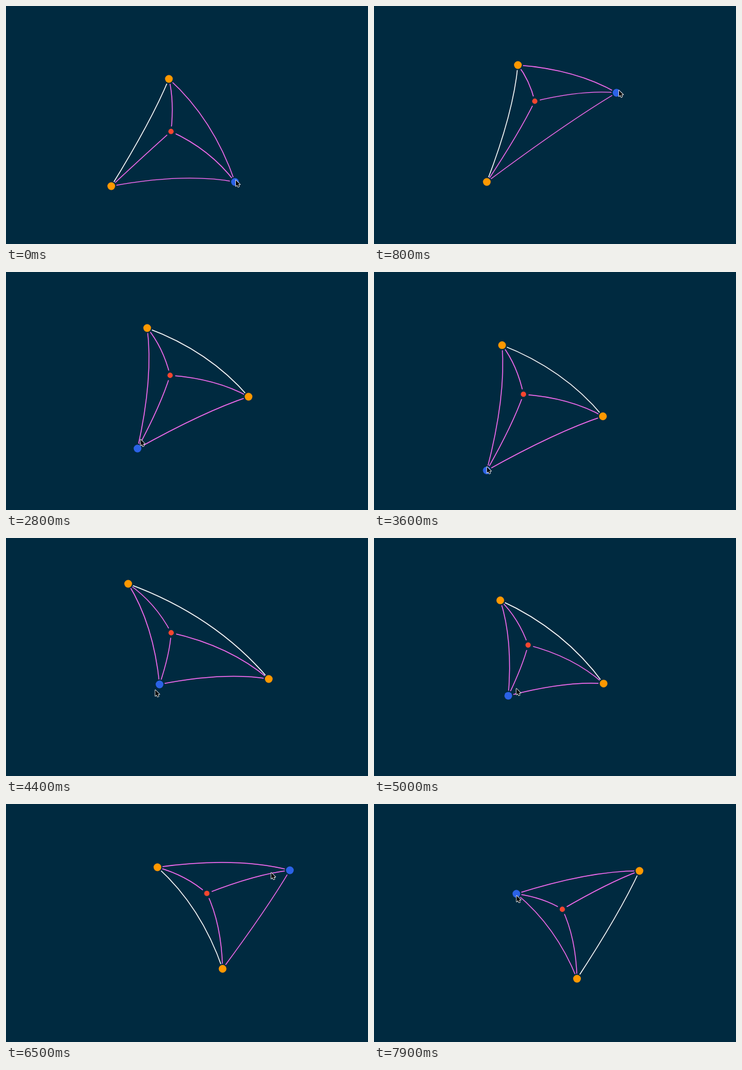
Write an HTML page with a canvas that moves like this. It is 600 px wide and 395 px high and loops after 8000 ms.

```html
<!DOCTYPE html>
<html lang="en">
<head>
<meta charset="utf-8">
<title>Elastic triangle</title>
<style>
html, body { margin: 0; width: 100%; height: 100%; overflow: hidden; background: #002a40; }
canvas { display: block; }
</style>
</head>
<body>
<canvas id="stage" width="600" height="395"></canvas>
<script>
const ctx = document.getElementById('stage').getContext('2d');
const LOOP = 8000, FRAME = 100, STEP = 10, LEAD = 25;
const BG = '#002a40', PINK = '#fa6cf4', ORANGE = '#ff9800', BLUE = '#2b62e6', RED = '#f8462f';
const REST = 202, STIFF = 2, BOW = 0.1, GAP = 14;

// Anchors: time, then x, y of the three corners
const anchors = [
  [0, 270, 121, 174.5, 299, 379.5, 292],
  [800, 238.5, 98, 187, 292, 402, 144],
  [2800, 234, 93, 218, 293, 402, 207],
  [4400, 202.5, 76, 254.5, 243, 435.5, 234],
  [5700, 212.5, 91, 438, 96, 389, 267],
  [6500, 251, 105, 470.5, 110, 359, 273.5],
  [7900, 236, 149, 440, 111, 336.5, 290]
];

// Drags: from, to, corner
const drags = [[0, 1800, 2], [2920, 6300, 1], [6950, LOOP + 1, 0]];
const pairs = [[0, 1], [0, 2], [1, 2]];

function dragged(t) {
  const d = drags.find(d => t >= d[0] && t < d[1]);
  return d ? d[2] : -1;
}

// The hand passes through these turns and through every corner it holds
const turns = [
  [550, 388, 205], [1100, 443, 100], [1800, 404, 208], [2800, 226, 274.5],
  [3300, 170, 350], [3600, 182, 328], [4150, 303, 173], [4750, 134, 353],
  [5400, 414, 76], [6100, 489, 101], [6300, 482, 106], [6500, 447.5, 113],
  [6950, 260, 107], [7300, 249, 110], [8000, 233, 160]
];
const grips = anchors.filter(a => dragged(a[0]) >= 0).map(a => {
  const i = 2 * dragged(a[0]) + 1;
  return [a[0], a[i], a[i + 1]];
});
const path = [...turns, ...grips].sort((a, b) => a[0] - b[0]);

function slope(i, d) {
  const a = path[Math.max(i - 1, 0)], b = path[Math.min(i + 1, path.length - 1)];
  return (b[d] - a[d]) / (b[0] - a[0]);
}

function hand(t) {
  let i = 0;
  while (i < path.length - 2 && t >= path[i + 1][0]) i++;
  const a = path[i], b = path[i + 1], h = b[0] - a[0], u = (t - a[0]) / h;
  const at = d => {
    const s = u * u * (3 - 2 * u);
    return a[d] + (b[d] - a[d]) * s +
      h * u * (1 - u) * (slope(i, d) * (1 - u) - slope(i + 1, d) * u);
  };
  return [at(1), at(2)];
}

// One step of the damped springs; a held corner follows the hand
function relax(p, t) {
  const held = dragged(t), move = p.map(() => 0), g = STIFF * STEP / 1000;
  for (const [i, j] of pairs) {
    const dx = p[2 * j] - p[2 * i], dy = p[2 * j + 1] - p[2 * i + 1];
    const d = Math.max(Math.hypot(dx, dy), 1), f = g * (d - REST) / d;
    move[2 * i] += dx * f; move[2 * i + 1] += dy * f;
    move[2 * j] -= dx * f; move[2 * j + 1] -= dy * f;
  }
  if (held >= 0) {
    const a = hand(t), b = hand(t + STEP);
    move[2 * held] = b[0] - a[0];
    move[2 * held + 1] = b[1] - a[1];
  }
  return p.map((v, i) => v + move[i]);
}

// Run the springs between anchors and spread the remaining drift evenly
const poses = [];
anchors.forEach((key, n) => {
  const start = key[0], next = anchors[n + 1], end = next ? next[0] : LOOP;
  const run = [];
  let p = key.slice(1);
  for (let t = start; t < end; t += STEP) {
    if (t % FRAME === 0) run.push(p);
    p = relax(p, t);
  }
  const drift = p.map((v, i) => next ? next[i + 1] - v : 0);
  run.forEach((q, k) => poses.push(q.map((v, i) => v + drift[i] * k / run.length)));
});

function nearest(nodes, [x, y]) {
  const d = nodes.map(n => Math.hypot(n[0] - x, n[1] - y));
  return d.indexOf(Math.min(...d));
}

function edge(a, b, color) {
  const bow = BOW * Math.max(Math.hypot(b[0] - a[0], b[1] - a[1]) - GAP, 0);
  ctx.beginPath();
  ctx.moveTo(a[0], a[1]);
  ctx.quadraticCurveTo((a[0] + b[0]) / 2 + bow, (a[1] + b[1]) / 2 - bow, b[0], b[1]);
  ctx.strokeStyle = color;
  ctx.lineWidth = 1.45;
  ctx.stroke();
}

function dot([x, y], r, color) {
  ctx.beginPath();
  ctx.arc(x, y, r, 0, 7);
  ctx.fillStyle = color;
  ctx.fill();
}

const arrow = new Path2D('M0 0V11.4L2.6 9L4.4 13L6.4 12.1L4.7 8.2H8.2Z');

function drawPointer([x, y]) {
  ctx.save();
  ctx.translate(x + 1, y + 1);
  ctx.scale(0.87, 0.87);
  ctx.lineJoin = 'round';
  ctx.strokeStyle = '#fff';
  ctx.lineWidth = 1.8;
  ctx.stroke(arrow);
  ctx.fillStyle = '#000';
  ctx.fill(arrow);
  ctx.restore();
}

function draw(t) {
  const p = poses[t / FRAME], tip = hand(t + LEAD);
  const nodes = [0, 2, 4].map(i => [p[i], p[i + 1]]);
  const [a, b, c] = nodes;
  const hub = [0, 1].map(d => a[d] / 2 + (b[d] + c[d]) / 4);
  const held = dragged(t), active = held >= 0 ? held : nearest(nodes, tip);

  ctx.fillStyle = BG;
  ctx.fillRect(0, 0, 600, 395);
  for (const [i, j] of pairs)
    edge(nodes[i], nodes[j], i === active || j === active ? PINK : '#fff');
  nodes.forEach(n => edge(n, hub, PINK));
  [...nodes, hub].forEach(n => dot(n, 8.6, BG));
  nodes.forEach((n, i) => dot(n, 6.4, i === active ? BLUE : ORANGE));
  dot(hub, 4.4, RED);
  drawPointer(tip);
}

const begin = performance.now();
function tick() {
  const t = Math.max(performance.now() - begin, 0) % LOOP;
  draw(Math.floor(t / FRAME) * FRAME);
  requestAnimationFrame(tick);
}
tick();
</script>
</body>
</html>
```
